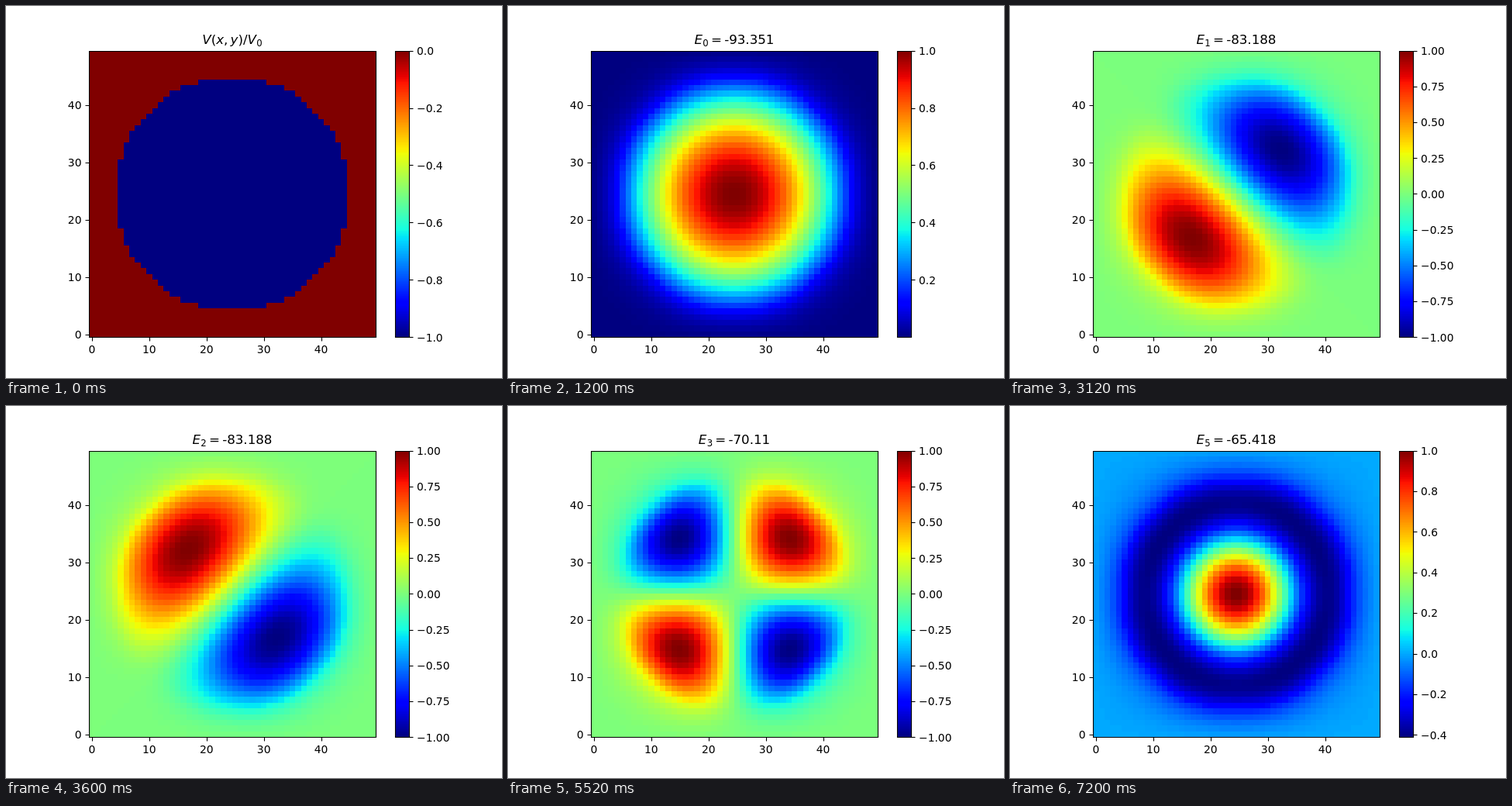
Write an HTML page with a canvas that moves like this. It is 640x480 px and loops after 8000 ms.

```html
<!DOCTYPE html>
<html lang="en">
<head>
<meta charset="utf-8">
<title>Circular well states</title>
<style>
  html, body { margin: 0; width: 100%; height: 100%; overflow: hidden; background: #fff; }
  canvas, svg { position: absolute; left: 0; top: 0; width: 640px; height: 480px; }
  text { font: 13.889px "DejaVu Sans", sans-serif; fill: #000; }
  #title { font-size: 16.667px; text-anchor: middle; }
  .it { font-style: italic; }
  .sub { font-size: 11.667px; }
  path { fill: none; stroke: #000; stroke-width: 1.11; }
</style>
</head>
<body>
<canvas id="map" width="640" height="480"></canvas>
<svg viewBox="0 0 640 480">
  <path d="M107.5 58.5H477.5V427.5H107.5ZM502.5 58.5H520.5V427.5H502.5Z"/>
  <g id="axes"></g>
  <g id="bar"></g>
  <text id="title" x="292" y="49"></text>
</svg>
<script>
const N = 50, W = N + 2, MID = (N - 1) / 2;
const LEFT = 107.2, TOP = 57.6, BOTTOM = 427.2, SIZE = BOTTOM - TOP, CELL = SIZE / N;
const DEPTH = 100, RADIUS = MID * 5 / 6, KINETIC = (MID) ** 2;
const HOLD = 1200, LOOP = 8000;
const $ = id => document.getElementById(id);
const ctx = $('map').getContext('2d');

// Grid functions carry a border of zeros (hard walls).
function grid(f) {
  const g = new Float64Array(W * W);
  for (let j = 0; j < N; j++)
    for (let i = 0; i < N; i++) g[(j + 1) * W + i + 1] = f(i - MID, j - MID);
  return g;
}
const well = grid((x, y) => x * x + y * y < RADIUS * RADIUS ? -1 : 0);

function dot(a, b) {
  let s = 0;
  for (let k = 0; k < a.length; k++) s += a[k] * b[k];
  return s;
}

// Lowest state with the symmetry of the start function, by imaginary-time steps.
function relax(start, lower) {
  const tau = 1 / 2600;
  let p = grid(start), q = new Float64Array(W * W);
  for (let n = 0; n < 1200; n++) {
    if (lower) {
      const c = dot(p, lower) / dot(lower, lower);
      for (let k = 0; k < p.length; k++) p[k] -= c * lower[k];
    }
    for (let j = 1; j <= N; j++)
      for (let k = j * W + 1; k <= j * W + N; k++) {
        const lap = p[k - 1] + p[k + 1] + p[k - W] + p[k + W] - 4 * p[k];
        q[k] = p[k] + tau * (KINETIC * lap - DEPTH * (1 + well[k]) * p[k]);
      }
    [p, q] = [q, p];
  }
  const peak = p.reduce((m, v) => Math.max(m, Math.abs(v)), 0);
  return p.map(v => v / peak);
}

const ground = relax(() => 1);
const it = s => `<tspan class="it">${s}</tspan>`;
const sub = s => `<tspan class="sub" dx=".3" dy="3">${s}</tspan>`;
const level = (n, e) =>
  `${it('E')}${sub(n)}<tspan dx="3.2" dy="-3">=</tspan><tspan dx="3.2">${e}</tspan>`;

const slides = [
  [well, `${it('V')}(${it('x')},<tspan class="it" dx="3.2">y</tspan>)/${it('V')}${sub(0)}`, 0.2],
  [ground, level(0, '-93.351'), 0.2],
  [relax((x, y) => -x - y), level(1, '-83.188'), 0.25],
  [relax((x, y) => y - x), level(2, '-83.188'), 0.25],
  [relax((x, y) => x * y), level(3, '-70.11'), 0.25],
  [relax((x, y) => x * x - y * y), level(4, '-69.774'), 0.25],
  [relax((x, y) => 300 - x * x - y * y, ground), level(5, '-65.418'), 0.2]
].map(([data, title, step]) => {
  let lo = Infinity, hi = -Infinity;
  for (let j = 1; j <= N; j++)
    for (let i = 1; i <= N; i++) {
      lo = Math.min(lo, data[j * W + i]);
      hi = Math.max(hi, data[j * W + i]);
    }
  return { data, title, step, lo, hi };
});

// Piecewise linear channels of the jet colour map.
function ramp(u, stops) {
  for (let k = 1; k < stops.length; k++) {
    const [a, va] = stops[k - 1], [b, vb] = stops[k];
    if (u <= b) return Math.round(255 * (va + (vb - va) * (u - a) / (b - a)));
  }
  return 0;
}
const RED = [[0, 0], [.35, 0], [.66, 1], [.89, 1], [1, .5]];
const GREEN = [[0, 0], [.125, 0], [.375, 1], [.64, 1], [.91, 0], [1, 0]];
const BLUE = [[0, .5], [.11, 1], [.34, 1], [.65, 0], [1, 0]];
function jet(v) {
  const u = Math.max(0, Math.min(255, Math.floor(v * 256))) / 255;
  return `rgb(${ramp(u, RED)},${ramp(u, GREEN)},${ramp(u, BLUE)})`;
}

const label = (x, y, s, anchor) =>
  `<text x="${x}" y="${y}" text-anchor="${anchor}">${s}</text>`;

function drawAxes() {
  let out = '';
  for (let v = 0; v < N; v += 10) {
    const d = (v + 0.5) * CELL;
    const x = Math.round(LEFT + d) + 0.5, y = Math.round(BOTTOM - d) + 0.5;
    out += `<path d="M${x} 427.5v5M107.5 ${y}h-5"/>`
      + label(LEFT + d, 448, v, 'middle')
      + label(97.5, Math.round(BOTTOM - d + 5.3), v, 'end');
  }
  $('axes').innerHTML = out;

  for (let y = 58; y < 428; y++) {
    ctx.fillStyle = jet((BOTTOM - y - 0.5) / SIZE);
    ctx.fillRect(502, y, 18, 1);
  }
}

function drawSlide({ data, title, step, lo, hi }) {
  const px = i => Math.round(LEFT + i * CELL), py = j => Math.round(BOTTOM - j * CELL);
  for (let j = 0; j < N; j++)
    for (let i = 0; i < N; i++) {
      ctx.fillStyle = jet((data[(j + 1) * W + i + 1] - lo) / (hi - lo));
      ctx.fillRect(px(i), py(j + 1), px(i + 1) - px(i), py(j) - py(j + 1));
    }

  let out = '';
  const digits = step === 0.25 ? 2 : 1;
  const last = Math.floor(hi / step + 1e-9);
  for (let n = Math.ceil(lo / step - 1e-9); n <= last; n++) {
    const y = BOTTOM - (n * step - lo) / (hi - lo) * SIZE;
    const s = (n * step).toFixed(digits).replace('-', '\u2212');
    out += `<path d="M520.5 ${Math.round(y) + 0.5}h5"/>`
      + label(530, Math.round(y + 5.3), s, 'start');
  }
  $('bar').innerHTML = out;
  $('title').innerHTML = title;
}

let shown = -1;
function tick() {
  const n = Math.floor(performance.now() % LOOP / HOLD);
  if (n !== shown) drawSlide(slides[shown = n]);
  requestAnimationFrame(tick);
}
drawAxes();
tick();
</script>
</body>
</html>
```
